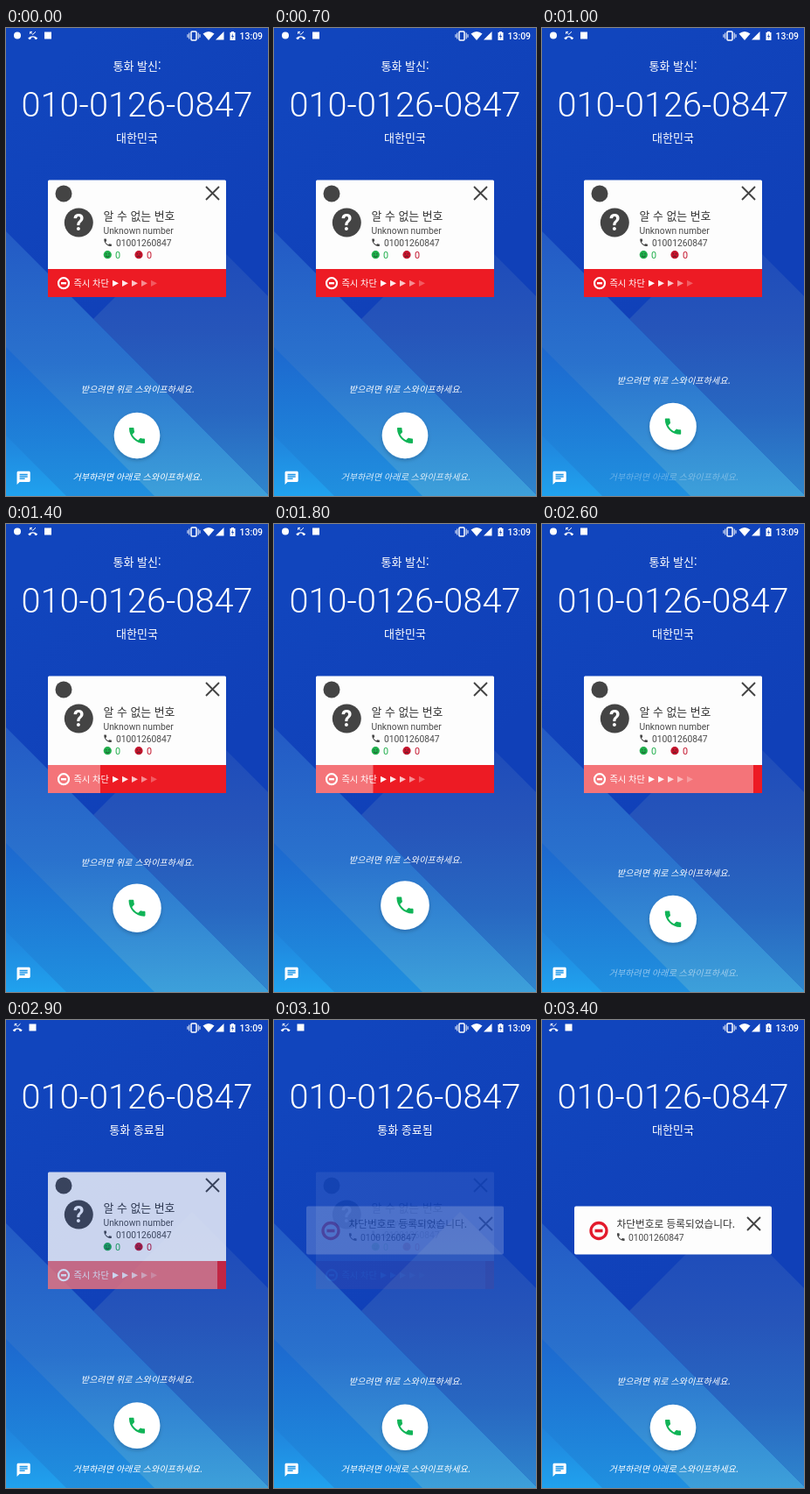
Write an HTML page that moves like this. It is 300x534 px and loops after 3500 ms.

```html
<!DOCTYPE html>
<html lang="ko">
<head>
<meta charset="utf-8">
<title>Incoming call</title>
<style>
html, body { margin: 0; width: 100%; height: 100%; overflow: hidden; background: #1243b8; }
svg { display: block; width: 100vw; height: 100vh; }
text { font-family: Roboto, "Noto Sans CJK KR", "Noto Sans CJK", sans-serif; }
.ko { font-family: "Noto Sans CJK KR", "Noto Sans CJK", sans-serif; }
.mid { text-anchor: middle; fill: #fff; }
.head { font-size: 13px; }
.hint { font-size: 10.15px; font-style: italic; }
.small { font-size: 10.3px; fill: #4a4a4a; }
.cross { stroke: #444; stroke-width: 1.9; fill: none; }
</style>
</head>
<body>
<svg viewBox="0 0 300 534" preserveAspectRatio="none">
  <defs>
    <linearGradient id="sky" gradientUnits="userSpaceOnUse" x1="0" y1="100" x2="200" y2="300">
      <stop offset="0" stop-color="#1145bd"/>
      <stop offset="1" stop-color="#1040b8"/>
    </linearGradient>
    <linearGradient id="peak" gradientUnits="userSpaceOnUse" x1="0" y1="219" x2="0" y2="534">
      <stop offset="0" stop-color="#1b48ba"/>
      <stop offset=".4" stop-color="#2655ba"/>
      <stop offset=".7" stop-color="#2867c1"/>
      <stop offset="1" stop-color="#2f86cd"/>
    </linearGradient>
    <linearGradient id="band" gradientUnits="userSpaceOnUse" x1="0" y1="232" x2="0" y2="534">
      <stop offset="0" stop-color="#235ac5"/>
      <stop offset=".5" stop-color="#2a72cd"/>
      <stop offset="1" stop-color="#3da0da"/>
    </linearGradient>
    <linearGradient id="lower" gradientUnits="userSpaceOnUse" x1="0" y1="340" x2="0" y2="534">
      <stop offset="0" stop-color="#1c62cc"/>
      <stop offset="1" stop-color="#2090df"/>
    </linearGradient>
    <linearGradient id="corner" x1="0" y1="0" x2="0" y2="1">
      <stop offset="0" stop-color="#2083dc"/>
      <stop offset="1" stop-color="#20a2ee"/>
    </linearGradient>
    <filter id="shadow" x="-30%" y="-30%" width="160%" height="170%">
      <feDropShadow dx="0" dy="2" stdDeviation="2" flood-color="#002" flood-opacity=".22"/>
    </filter>
    <path id="phone" d="M6.62 10.79c1.44 2.83 3.76 5.14 6.59 6.59l2.2-2.2c.27-.27.67-.36 1.02-.24 1.12.37 2.33.57 3.57.57.55 0 1 .45 1 1V20c0 .55-.45 1-1 1-9.39 0-17-7.61-17-17 0-.55.45-1 1-1h3.5c.55 0 1 .45 1 1 0 1.25.2 2.45.57 3.57.11.35.03.74-.25 1.02z"/>
    <g id="block">
      <circle r="6" fill="none" stroke="currentColor" stroke-width="2.2"/>
      <path d="M-3 0H3" stroke="currentColor" stroke-width="2.4"/>
    </g>
    <g id="face">
      <circle r="4.6"/>
      <path d="M-1.7-1.6v1.2M1.7-1.6v1.2" stroke="#222" stroke-opacity=".7"/>
    </g>
    <path id="cross" class="cross" d="M0 0 15 15M15 0 0 15"/>
  </defs>

  <rect width="300" height="534" fill="url(#sky)"/>
  <path d="M100 332 213 219 300 306V532Z" fill="url(#peak)"/>
  <path d="M0 232 300 532V534H0Z" fill="url(#band)"/>
  <path d="M0 364 170 534H0Z" fill="url(#lower)"/>
  <path d="M0 465 69 534H0Z" fill="url(#corner)"/>

  <g fill="#fff">
    <circle id="carrier" cx="13" cy="8.5" r="4"/>
    <g id="notices">
      <path d="M25.2 11.6q5.5-4.6 11 0l-1.6 1.7-2-1.1v-1.3q-1.9-.6-3.8 0v1.3l-2 1.1z"/>
      <path d="M27.6 6.8V4.4H30M27.8 4.6 30.7 7.4 34 4.2" fill="none" stroke="#fff"/>
      <rect x="44" y="4.5" width="8" height="8"/>
    </g>
    <rect x="212" y="4" width="6" height="10" rx="1" fill="none" stroke="#fff" stroke-width="1.5"/>
    <path d="M209.8 5.5v7M220.2 5.5v7M208 7.2v3.6M222 7.2v3.6" stroke="#fff" stroke-width="1"/>
    <path d="M225.5 6.5q6.5-5 13 0L232 14Z"/>
    <path d="M240 13.5 249.5 4V13.5Z"/>
    <path d="M256.5 5H258V4h3V5h1.5V14h-6Z"/>
    <path d="M260 6 258 10h1.5l-.5 3 2-4h-1.4z" fill="#1243b8"/>
    <text x="294" y="12.5" font-size="10.4" font-weight="500" text-anchor="end">13:09</text>
  </g>

  <text id="calling" class="ko mid head" x="150" y="48.3">통화 발신:</text>
  <text class="mid" x="150" y="100.5" font-size="39.7" font-weight="300">010-0126-0847</text>
  <text id="status" class="ko mid head" x="150" y="130"></text>

  <g id="callCard">
    <rect x="48" y="173.5" width="204" height="133" rx="1.5" fill="#fdfdfd"/>
    <circle cx="66" cy="189" r="9.5" fill="#444"/>
    <use href="#cross" x="229" y="181"/>
    <circle cx="83.3" cy="222" r="16.5" fill="#444"/>
    <text class="mid" x="83.3" y="231" font-size="25" font-weight="700">?</text>
    <text class="ko" x="111.5" y="219.3" font-size="12.9" font-weight="500" fill="#333">알 수 없는 번호</text>
    <text class="small" x="111.5" y="234.5">Unknown number</text>
    <use href="#phone" transform="translate(110.8 239)scale(.48)" fill="#444"/>
    <text class="small" x="126" y="249">01001260847</text>
    <g fill="#1fae4b">
      <use href="#face" x="116.3" y="258.7"/>
      <path d="M114 260q2.3 2.5 4.6 0" fill="none" stroke="#222" stroke-opacity=".7"/>
      <text x="125" y="263" font-size="10.8">0</text>
    </g>
    <g fill="#c4142c">
      <use href="#face" x="152" y="258.7"/>
      <path d="M149.8 261.2q2.2-2.2 4.4 0" fill="none" stroke="#222" stroke-opacity=".7"/>
      <text x="161" y="263" font-size="10.8">0</text>
    </g>
    <rect x="48" y="275" width="204" height="32" fill="#ed1b24"/>
    <rect id="swipe" x="48" y="275" height="32" fill="#fff" opacity=".39"/>
    <use href="#block" x="66" y="291.2" color="#fff"/>
    <text class="ko" x="77.5" y="295" font-size="10.2" fill="#fff">즉시 차단</text>
    <g id="arrows" fill="#fff"></g>
  </g>

  <g id="doneCard">
    <rect x="37" y="212.5" width="226" height="55" rx="2" fill="#fdfdfd"/>
    <use href="#block" transform="translate(65 240.5)scale(1.5)" color="#e31b2c"/>
    <text class="ko" x="85.5" y="236.5" font-size="11.7" font-weight="500" fill="#333">차단번호로 등록되었습니다.</text>
    <use href="#phone" transform="translate(84.5 241.8)scale(.48)" fill="#444"/>
    <text class="small" x="99" y="251.5">01001260847</text>
    <use href="#cross" x="235" y="225"/>
  </g>

  <text id="answer" class="ko mid hint" x="150.5">받으려면 위로 스와이프하세요.</text>
  <g id="puck">
    <circle r="26.3" fill="#fff" filter="url(#shadow)"/>
    <use href="#phone" x="-12" y="-12" fill="#10b457"/>
  </g>
  <text id="reject" class="ko mid hint" x="150.5" y="515.5">거부하려면 아래로 스와이프하세요.</text>
  <path transform="translate(11 504.3)scale(.76)" fill="#fff" d="M20 2H4c-1.1 0-2 .9-2 2V22l4-4h14c1.1 0 2-.9 2-2V4c0-1.1-.9-2-2-2zM6 9h12v2H6zm8 5H6v-2h8zm4-6H6V6h12z"/>
</svg>
<script>
const LOOP = 3500, STEP = 100;
const $ = id => document.getElementById(id);
const set = (id, name, value) => $(id).setAttribute(name, value);
const ramp = (t, from, to) => Math.min(1, Math.max(0, (t - from) / (to - from)));

// Cubic bezier (.4, 0, .2, 1), solved by bisection
function ease(x) {
  let lo = 0, hi = 1;
  for (let i = 0; i < 24; i++) {
    const s = (lo + hi) / 2;
    const bx = 1.2 * s * (1 - s) ** 2 + .6 * s * s * (1 - s) + s ** 3;
    if (bx < x) lo = s; else hi = s;
  }
  return lo * lo * (3 - 2 * lo);
}

$("arrows").innerHTML = [1, .9, .75, .5, .28].map((alpha, i) =>
  `<path d="M${122 + i * 11} 287.7l7 3.6-7 3.6z" opacity="${alpha}"/>`).join("");

function swipeWidth(t) {
  if (t < 1300) return 0;
  return 58 + 2 * ramp(t, 1300, 1400) + 11 * ramp(t, 1400, 2200) + 123 * ramp(t, 2200, 2500);
}

function draw(t) {
  const lift = ease(ramp(t, 650, 1850)) - ease(ramp(t, 2250, 3220));
  const ended = t >= 2800;

  set("puck", "transform", `translate(150 ${465 - 30 * lift})scale(${1 + .06 * lift})`);
  set("answer", "y", 416.3 - 29.5 * lift);
  set("reject", "opacity", 1 - ramp(t, 600, 1200) + ramp(t, 2350, 2850));

  set("swipe", "width", swipeWidth(t));
  set("callCard", "opacity", 1 - ramp(t, 2840, 3120));
  set("doneCard", "opacity", ramp(t, 3050, 3300));

  set("calling", "opacity", ended ? 0 : 1);
  set("carrier", "opacity", ended ? 0 : 1);
  set("notices", "transform", `translate(${ended ? -17.5 : 0} 0)`);
  $("status").textContent = ended && t < 3200 ? "통화 종료됨" : "대한민국";
}

const start = performance.now();
function tick() {
  const t = (performance.now() - start) % LOOP;
  draw(Math.floor(t / STEP) * STEP);
  requestAnimationFrame(tick);
}
tick();
</script>
</body>
</html>
```
